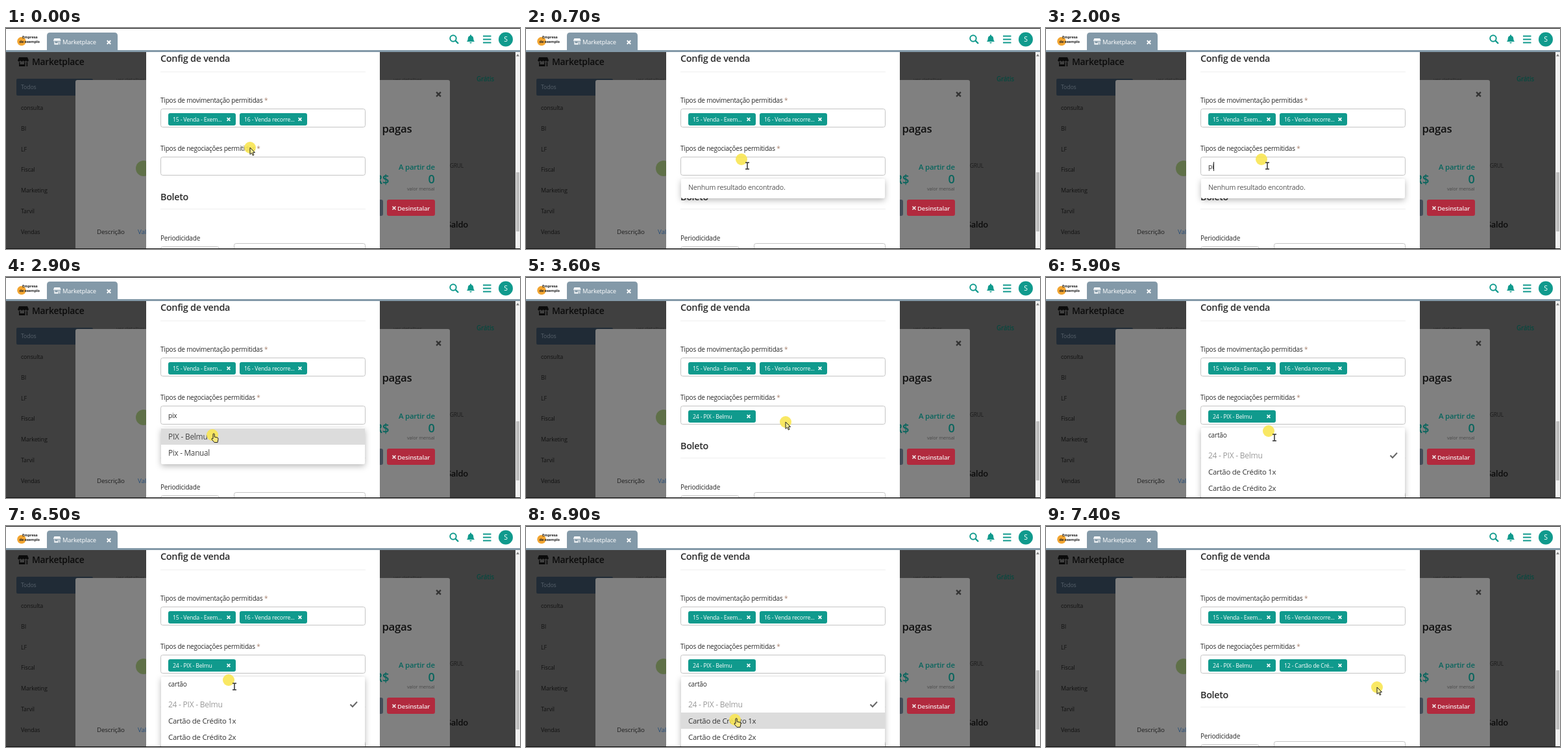
An HTML page that plays this animation: 792 px wide and 340 px high, repeating every 8100 ms.

```html
<!DOCTYPE html>
<html lang="pt-BR">
<head>
<meta charset="utf-8">
<title>Config de venda</title>
<style>
html, body { margin: 0; width: 100%; height: 100%; overflow: hidden; background: #fff; }
svg { display: block; width: 792px; height: 340px; }
text { font-family: "Open Sans", "Noto Sans", sans-serif; letter-spacing: -.02em; white-space: pre; }
.b { font-weight: 600; }
.menu { filter: drop-shadow(0 3px 5px rgba(0, 0, 0, .28)); }
</style>
</head>
<body>
<svg id="stage" viewBox="0 0 792 340">
  <defs>
    <g id="shop">
      <path d="M2 0H15L17 5H0Z"/>
      <path d="M0 5q2 3.4 4.25 0q2.1 3.4 4.25 0q2.1 3.4 4.25 0q2.1 3.4 4.25 0"/>
      <path d="M2 7.500V14H11.500V7.500H10V11H3.500V7.500ZM13.500 7.500H15.200V14H13.500Z"/>
    </g>
    <path id="cross" d="M-2.500 -2.500L2.500 2.500M2.500 -2.500L-2.500 2.500" fill="none" stroke-width="1.700"/>
    <clipPath id="side"><rect x="684" y="37" width="101" height="303"/></clipPath>
  </defs>
  <g id="page"></g>
  <g id="modal"></g>
  <g id="live"></g>
  <g id="top"></g>
  <g id="pointer">
    <circle r="9" fill="#f8e653" opacity=".9"/>
    <path id="arrow" d="M0 0V10.500L2.500 8.300L4.300 12.200L6 11.400L4.300 7.600H7.600Z" fill="#f6ef9a" stroke="#222" stroke-width="1"/>
    <path id="beam" d="M6 5H8.300L9 5.700L9.700 5H12M9 5.500V14.500M6 15H8.300L9 14.300L9.700 15H12" fill="none" stroke="#333" stroke-width="1.500"/>
    <path id="hand" d="M1 -1.500Q2.200 -2.800 3.200 -1.500V3L8 4.200Q9.400 4.800 9 6.500L8 11.500H3L-.8 7Q-1.500 5.200 .2 5.200L1 5.800Z" fill="#f8e77c" stroke="#222" stroke-width="1"/>
  </g>
</svg>
<script>
const LOOP = 8100, STEP = 100, TEAL = '#109a8d', INK = '#2b2b2b';
const NS = 'http://www.w3.org/2000/svg';
const $ = id => document.getElementById(id);

function add(parent, tag, attrs, content) {
  const el = document.createElementNS(NS, tag);
  for (const k in attrs) el.setAttribute(k, attrs[k]);
  if (content) el.textContent = content;
  parent.appendChild(el);
  return el;
}
const group = (parent, attrs) => add(parent, 'g', attrs);
const rect = (p, x, y, width, height, fill, more) => add(p, 'rect', { x, y, width, height, fill, ...more });
const text = (p, x, y, size, content, fill = INK, more) =>
  add(p, 'text', { x, y, 'font-size': size, fill, ...more }, content);
const path = (p, d, stroke, width = 1, more) =>
  add(p, 'path', { d, stroke, 'stroke-width': width, fill: 'none', ...more });
const circle = (p, cx, cy, r, fill) => add(p, 'circle', { cx, cy, r, fill });
const cross = (p, x, y, stroke, scale = 1) =>
  add(p, 'use', { href: '#cross', stroke, transform: `translate(${x} ${y}) scale(${scale})` });
const bold = { class: 'b' };

function drawPage(g) {
  rect(g, 0, 37, 792, 303, '#404040');
  add(g, 'use', { href: '#shop', fill: '#0b0b0b', transform: 'translate(18 45)' });
  text(g, 40, 57, 13.9, 'Marketplace', '#0b0b0b', bold);
  rect(g, 16, 78, 118, 26, '#202b36', { rx: 2 });
  text(g, 23, 94, 8.8, 'Todos', '#56606a');
  ['consulta', 'BI', 'LF', 'Fiscal', 'Marketing', 'Tarvil', 'Vendas']
    .forEach((s, i) => text(g, 23, 126 + i * 31.8, 9, s, '#121212'));
  text(g, 170, 82, 8, 'ver detalhes', '#2b2b2b');
  text(g, 597, 82, 8, 'ver detalhes', '#2b2b2b');
  text(g, 725, 82, 9.8, 'Grátis', '#08483f', bold);
  const side = group(g, { 'clip-path': 'url(#side)' });
  text(side, 705, 215, 8.5, 'GRUL', '#1c1c1c', { 'text-anchor': 'end' });
  text(side, 712, 307, 13, 'Saldo', '#0b0b0b', { class: 'b', 'text-anchor': 'end' });

  rect(g, 107, 80, 577, 270, '#808080', { rx: 3 });
  cross(g, 666.5, 102, '#333', 1.35);
  text(g, 579.5, 161, 16.8, 'pagas', '#101010', bold);
  text(g, 605, 218, 11.4, 'A partir de', '#09655d', bold);
  text(g, 568, 240, 19, 'R$', '#09655d', bold);
  text(g, 650.5, 239, 18, '0', '#09655d', bold);
  text(g, 618, 250, 7.4, 'valor mensal', '#4a4a4a');
  rect(g, 560, 264, 21, 25, '#434d58', { rx: 3 });
  rect(g, 587, 264, 74, 25, '#b12a3e', { rx: 3 });
  cross(g, 598, 277, '#f1e4e6');
  text(g, 603, 280.5, 9.6, 'Desinstalar', '#f1e4e6', bold);
  text(g, 140, 317, 9.8, 'Descrição', '#202020');
  text(g, 203, 317, 9.8, 'Valores', '#264d78');
  circle(g, 212, 216, 12, '#5f7048');
}

function drawTag(g, x, y, label) {
  rect(g, x, y, 104, 19, TEAL, { rx: 3 });
  text(g, x + 7, y + 13, 8.7, label, '#fff');
  cross(g, x + 93, y + 9.5, '#fff', .95);
}

const field = (g, x, y, w, h) => rect(g, x, y, w, h, '#fff', { rx: 3, stroke: '#c4c4c4' });

function label(g, y, s) {
  const t = text(g, 238, y, 10, s);
  add(t, 'tspan', { fill: '#a8836f' }, ' *');
}

function drawModal(g) {
  rect(g, 216, 37, 360, 303, '#fff');
  text(g, 238, 52, 14.4, 'Config de venda', INK, bold);
  text(g, 238, 264.5, 14.3, 'Boleto', INK, bold);
  path(g, 'M238 67.500H554M238 278.500H554', '#efefef');
  label(g, 115, 'Tipos de movimentação permitidas');
  label(g, 189, 'Tipos de negociações permitidas');
  field(g, 238.5, 124.5, 315, 28);
  field(g, 238.5, 198.5, 315, 28);
  drawTag(g, 250, 131, '15 - Venda - Exem...');
  drawTag(g, 360, 131, '16 - Venda recorre...');
  text(g, 238, 327, 10, 'Periodicidade');
  field(g, 238.5, 336.5, 90, 20);
  field(g, 351.5, 331.5, 202, 20);
}

function drawTop(g) {
  rect(g, 0, 0, 792, 35, '#fff');
  rect(g, 0, 34, 792, 3, '#8399a8');
  path(g, 'M63 35V12Q63 7 68 7H167Q172 7 172 12V35Z', 'none', 0, { fill: '#8399a8' });
  add(g, 'use', { href: '#shop', fill: '#fff', transform: 'translate(73 16) scale(.68)' });
  text(g, 87, 24.5, 9.4, 'Marketplace', '#fff');
  cross(g, 158.5, 22, '#fff', 1.1);
  circle(g, 24, 20.5, 6.8, '#f2a531');
  text(g, 25, 15.5, 5.7, 'Empresa', '#222', { 'font-weight': 700 });
  text(g, 20.5, 22.5, 5.7, 'de exemplo', '#222', { 'font-weight': 700 });

  path(g, 'M692.500 19.500L697 24', TEAL, 2.4);
  add(g, 'circle', { cx: 689, cy: 16, r: 4.7, fill: 'none', stroke: TEAL, 'stroke-width': 2 });
  path(g, 'M710 21Q711.800 19 711.800 16Q712 12.500 715 12V10.500H717V12Q720 12.500 720.200 16Q720.200 19 722 21ZM714 22H718Q716 25.500 714 22Z', 'none', 0, { fill: TEAL });
  path(g, 'M735 12.500H747.500M735 17.500H747.500M735 22.500H747.500', TEAL, 2);
  circle(g, 770, 17.5, 11, TEAL);
  text(g, 770, 21.3, 10.5, 'S', '#fff', { 'text-anchor': 'middle' });

  rect(g, 785, 37, 7, 303, '#f1f1f1');
  rect(g, 786, 222, 5, 91, '#bdbdbd');
  path(g, 'M786 43.500L788.500 40L791 43.500Z', 'none', 0, { fill: '#777' });
  rect(g, 0, 0, 792, 1, '#111');
  rect(g, 0, 339, 792, 1, '#111');
}

function menu(g, bottom) {
  const box = group(g, { class: 'menu' });
  rect(box, 239, 232, 314, bottom - 232, '#fff', { rx: 2 });
  return {
    hover: rect(g, 239, 233, 314, 25, '#dcdcdc', { display: 'none' }),
    g
  };
}

function makeMenu(bottom, draw) {
  const g = group($('live'), {});
  const m = menu(g, bottom);
  draw(g);
  return m;
}

const picked = g => {
  text(g, 250, 279, 12, '24 - PIX - Belmu', '#999');
  path(g, 'M530.500 274.500L534 278L541 270.500', '#666', 2);
};

drawPage($('page'));
drawModal($('modal'));
drawTop($('top'));

const live = $('live');
const tagA = group(live, {}), tagB = group(live, {});
drawTag(tagA, 250, 205, '24 - PIX - Belmu');
drawTag(tagB, 360, 205, '12 - Cartão de Cré...');

const menus = {
  none: makeMenu(262, g => text(g, 250, 249, 10.6, 'Nenhum resultado encontrado.', '#555')),
  pix: makeMenu(288, g => {
    text(g, 250, 250, 11.9, 'PIX - Belmu', '#444');
    text(g, 250, 274.5, 11.7, 'Pix - Manual', '#444');
  }),
  rest: makeMenu(317, g => {
    picked(g);
    text(g, 250, 304, 11.7, 'Pix - Manual', '#333');
  }),
  card: makeMenu(360, g => {
    picked(g);
    text(g, 250, 304, 11.4, 'Cartão de Crédito 1x', '#333');
    text(g, 250, 328.5, 11.4, 'Cartão de Crédito 2x', '#333');
  })
};
menus.card.hover.setAttribute('y', 287);

const typed = text(live, 250, 217, 10.1, '');
const caret = rect(live, 250, 206, 1, 14, '#222');

// Step tables: [start time, value]
const menuSteps = [[0, ''], [400, 'none'], [2600, 'pix'], [3100, ''], [4100, 'rest'], [5900, 'card'], [7100, '']];
const typeSteps = [[0, ''], [1800, 'p'], [2000, 'pi'], [2200, 'pix'], [3100, ''],
  [4900, 'c'], [5200, 'ca'], [5400, 'car'], [5600, 'cartão'], [7100, '']];
const caretSteps = [[0, 0], [400, 1], [700, 0], [1000, 1], [1300, 0], [1600, 1], [2400, 0],
  [4100, 1], [4400, 0], [4500, 1], [4700, 0], [4900, 1], [5900, 0], [6200, 1], [6500, 0]];
const cursorSteps = [[0, 'arrow'], [300, 'beam'], [2700, 'hand'], [3200, 'arrow'],
  [5200, 'beam'], [6700, 'hand'], [7100, 'arrow']];
const route = [[0, 376, 184], [400, 332, 202], [2500, 332, 202], [2800, 318, 243], [3100, 318, 243],
  [3500, 400, 223], [3600, 400, 223], [4000, 405, 216], [4900, 405, 216], [5300, 343, 237],
  [6500, 343, 237], [6800, 322, 298], [7000, 322, 298], [7400, 510, 248], [LOOP, 510, 248]];

const at = (steps, t) => steps.filter(s => s[0] <= t).pop()[1];
const show = (el, on) => el.setAttribute('display', on ? 'inline' : 'none');

function place(t) {
  const i = route.findIndex(k => k[0] > t);
  const [t0, x0, y0] = route[i - 1], [t1, x1, y1] = route[i];
  const p = (t - t0) / (t1 - t0), e = p * p * (3 - 2 * p);
  return [x0 + (x1 - x0) * e, y0 + (y1 - y0) * e];
}

function render(now) {
  const t = Math.floor(now % LOOP / STEP) * STEP;
  const [x, y] = place(t);
  const open = at(menuSteps, t), kind = at(cursorSteps, t);

  for (const name in menus) show(menus[name].g, name === open);
  show(menus.pix.hover, y > 232 && y < 258);
  show(menus.card.hover, y > 287);
  show(tagA, t >= 3100);
  show(tagB, t >= 7100);

  const dy = t < 3100 ? 0 : 29.5;
  typed.textContent = at(typeSteps, t);
  typed.setAttribute('y', 217 + dy);
  caret.setAttribute('x', 250 + Math.round(typed.textContent ? typed.getComputedTextLength() : 0));
  caret.setAttribute('y', Math.round(206 + dy));
  show(caret, at(caretSteps, t));

  $('pointer').setAttribute('transform', `translate(${x} ${y})`);
  for (const k of ['arrow', 'beam', 'hand']) show($(k), k === kind);
}

const start = performance.now();
function tick() {
  render(performance.now() - start);
  requestAnimationFrame(tick);
}
tick();
</script>
</body>
</html>
```
